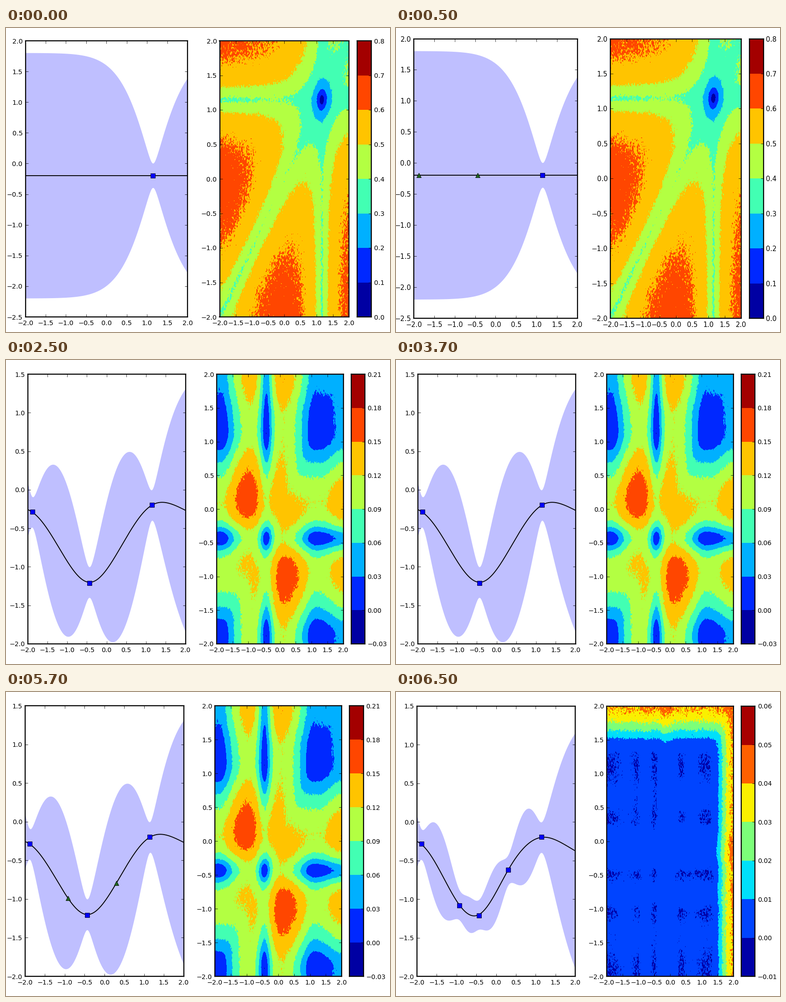
A matplotlib script that plays this animation: 842x665 px, repeating every 8000 ms.

```python
import numpy as np
import matplotlib.pyplot as plt
from matplotlib.animation import FuncAnimation
from matplotlib.colors import BoundaryNorm, ListedColormap

W, H, DPI = 842, 665, 100
FIT_NOISE, SAMPLE_NOISE, SAMPLES = 0.01, 0.1, 2000
PT = 72 / DPI

plt.rcParams.update({"font.family": "DejaVu Sans", "axes.unicode_minus": True})


def kernel(a, b):
    """Matern 5/2 covariance with unit scale."""
    r = np.sqrt(5) * np.abs(np.subtract.outer(a, b))
    return (1 + r + r * r / 3) * np.exp(-r)


def posterior(data, x):
    xs, ys = np.array(data).T
    cross = kernel(x, xs)
    weights = np.linalg.solve(kernel(xs, xs) + FIT_NOISE * np.eye(len(xs)), cross.T).T
    return ys.mean() + weights @ (ys - ys.mean()), kernel(x, x) - weights @ cross.T


def disc_quadrature(radii=18, angles=24):
    """Nodes and weights for a two-dimensional standard normal."""
    r = (np.arange(radii) + 0.5) * 4.5 / radii
    t = (np.arange(angles) + 0.37) * 2 * np.pi / angles
    w = np.repeat(r * np.exp(-r * r / 2), angles)
    return np.outer(r, np.cos(t)).ravel(), np.outer(r, np.sin(t)).ravel(), w / w.sum()


def knowledge_gain(data, seed, n=101):
    """Expected drop of the lowest mean after sampling a pair of points."""
    nodes = np.linspace(-2, 2, n)
    mean, cov = posterior(data, nodes)
    mu, inner = mean[::2], cov[::2]
    z1, z2, w = disc_quadrature()
    gain, spread = np.zeros((n, n)), np.zeros((n, n))
    for i in range(n):
        j = slice(0, i + 1)
        l11 = np.sqrt(cov[i, i] + SAMPLE_NOISE)
        l21 = cov[i, j] / l11
        l22 = np.sqrt(np.diag(cov)[j] + SAMPLE_NOISE - l21 ** 2)
        s1 = inner[:, i] / l11
        s2 = (inner[:, j] - np.outer(s1, l21)) / l22
        base = mu[:, None] + np.outer(s1, z1)
        low = np.full((i + 1, len(w)), np.inf)
        for row, slope in zip(base, s2):
            np.minimum(low, row + np.outer(slope, z2), out=low)
        m = low @ w
        gain[i, j] = gain[j, i] = mu.min() - m
        spread[i, j] = spread[j, i] = np.sqrt(np.maximum((low ** 2) @ w - m ** 2, 0))
    fine = np.linspace(-2, 2, 2 * n - 1)
    hat = np.maximum(0, 1 - np.abs(np.subtract.outer(fine, nodes)) * (n - 1) / 4)
    gain, spread = hat @ gain @ hat.T, hat @ spread @ hat.T
    jitter = np.random.default_rng(seed).standard_normal(gain.shape)
    return gain + spread * jitter / np.sqrt(SAMPLES)


ONE = [(1.147, -0.195)]
THREE = ONE + [(-1.882, -0.285), (-0.435, -1.21)]
FIVE = THREE + [(-0.925, -1.08), (0.305, -0.618)]

# observations, value range of the left panel, levels of the right panel
STAGES = [
    (ONE, (-2.5, 2.0), np.round(np.arange(9) * 0.1, 2)),
    (THREE, (-2.0, 1.5), np.round(np.arange(-1, 8) * 0.03, 2)),
    (FIVE, (-2.0, 1.5), np.round(np.arange(-1, 7) * 0.01, 2)),
]
FIELDS = [knowledge_gain(stage[0], seed) for seed, stage in enumerate(STAGES)]

# stage, proposed points, top and bottom, then left and right of the three panels
SCENES = [
    (0, [], (28, 632), (42.5, 398), (468.5, 752), (769.5, 800.5)),
    (0, [-1.882, -0.435], (23.5, 635), (39, 398), (470, 757), (774.5, 805.5)),
    (1, [], (31, 621), (47.5, 393.5), (462, 739.5), (756.5, 786.5)),
    (1, [-0.92, 0.305], (30, 622), (42, 389.5), (458, 736), (753, 783.5)),
    (2, [], (31, 622), (46, 393), (462, 740), (757, 787)),
]
STARTS = [0, 1, 5, 9, 13]

fig = plt.figure(figsize=(W / DPI, H / DPI), dpi=DPI, facecolor="white")


def panel(span, rows):
    (left, right), (top, bottom) = span, rows
    ax = fig.add_axes([left / W, 1 - bottom / H, (right - left) / W, (bottom - top) / H])
    em = 0.0239 * (bottom - top) * PT
    ax.tick_params(direction="in", top=True, right=True, length=6 * PT,
                   width=0.8 * PT, labelsize=em)
    ax.tick_params(axis="x", pad=7 * PT)
    ax.tick_params(axis="y", pad=6 * PT)
    for spine in ax.spines.values():
        spine.set_linewidth(2.3 * PT)
        spine.set_zorder(6)
    return ax


def half_steps(low, high):
    return np.arange(low, high + 0.1, 0.5)


def draw_model(ax, data, limits, proposals):
    x = np.linspace(-2, 2, 401)
    mean, cov = posterior(data, x)
    band = 2 * np.sqrt(np.diag(cov))
    ax.fill_between(x, mean - band, mean + band, color="#bfbfff", lw=0)
    ax.plot(x, mean, color="black", lw=1.9 * PT)
    marks = dict(ls="", mec="black", mew=0.8 * PT, zorder=5)
    ax.plot(*np.array(data).T, "s", mfc="blue", ms=10 * PT, **marks)
    if proposals:
        ax.plot(proposals, posterior(data, np.array(proposals))[0], "^",
                mfc="#1f661f", ms=10.5 * PT, **marks)
    ax.set(xlim=(-2, 2), ylim=limits, xticks=half_steps(-2, 2), yticks=half_steps(*limits))


def draw_field(ax, field, levels, cmap):
    edge = 2 + 2 / (len(field) - 1)
    ax.imshow(field, origin="lower", extent=(-edge, edge, -edge, edge), aspect="auto",
              cmap=cmap, norm=BoundaryNorm(levels, cmap.N),
              interpolation="bilinear", interpolation_stage="data")
    ax.set(xlim=(-2, 2), ylim=(-2, 2), xticks=half_steps(-2, 2), yticks=half_steps(-2, 2))


def draw_bar(ax, levels, cmap):
    ax.imshow(np.arange(cmap.N)[:, None], origin="lower", cmap=cmap, aspect="auto",
              extent=(0, 1, levels[0], levels[-1]), interpolation="nearest")
    ax.set(xticks=[], yticks=levels)
    ax.tick_params(axis="y", left=False, labelleft=False, labelright=True)


def update(frame):
    fig.clf()
    index = sum(frame >= start for start in STARTS) - 1
    stage, proposals, rows, model, field, bar = SCENES[index]
    data, limits, levels = STAGES[stage]
    bins = len(levels) - 1
    cmap = ListedColormap(plt.get_cmap("jet")((np.arange(bins) + 0.25) / (bins - 0.5)))
    draw_model(panel(model, rows), data, limits, proposals)
    draw_field(panel(field, rows), FIELDS[stage], levels, cmap)
    draw_bar(panel(bar, rows), levels, cmap)
    return []


anim = FuncAnimation(fig, update, frames=16, interval=500, init_func=lambda: [],
                     repeat=True, repeat_delay=0, blit=False)
plt.show()
```
